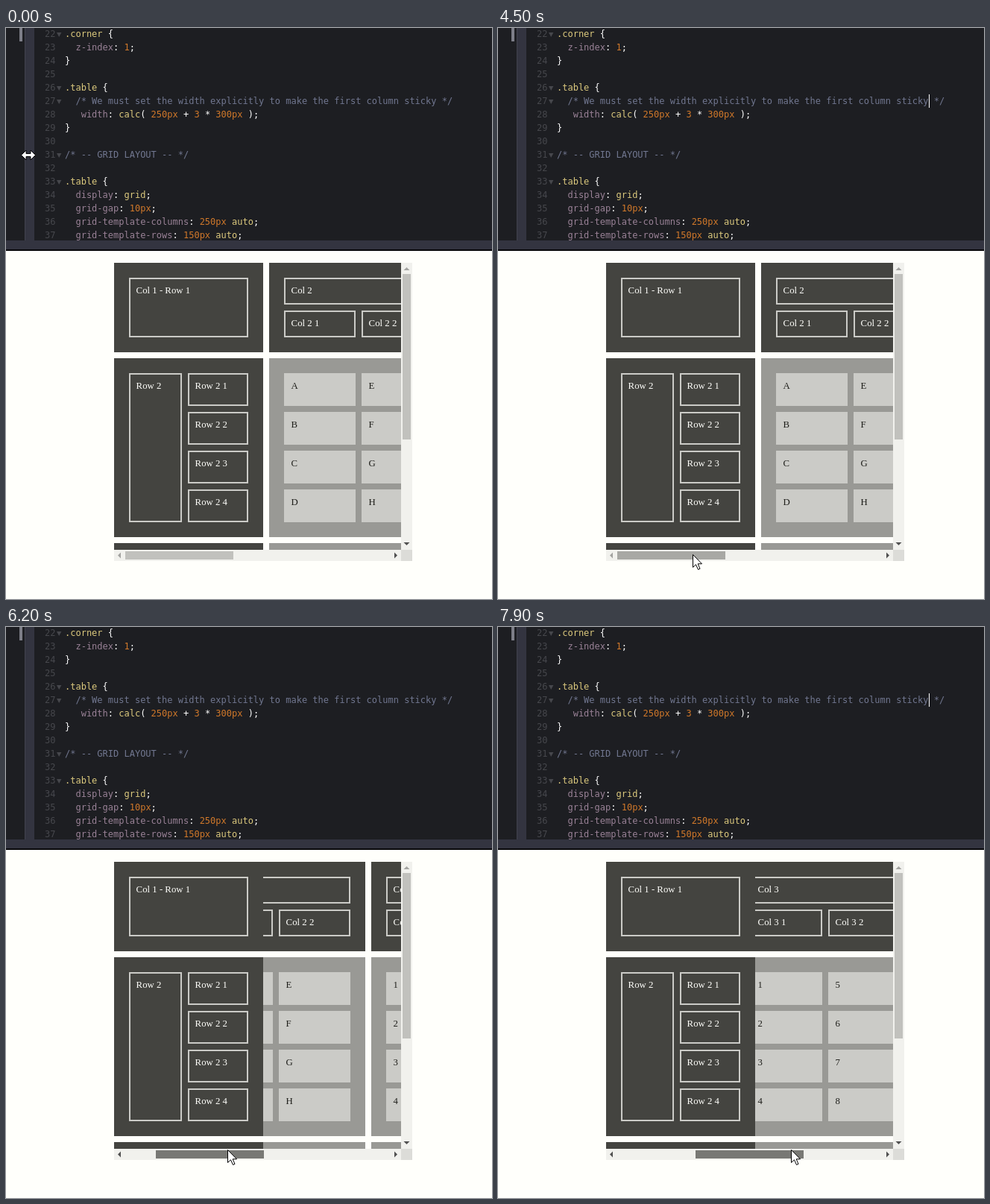
An HTML page that plays this animation: 652 by 766 pixels, repeating every 8000 ms.

```html
<!DOCTYPE html>
<html lang="en">
<head>
<meta charset="utf-8">
<title>Sticky table</title>
<style>
  html, body { margin: 0; width: 100%; height: 100%; overflow: hidden; background: #fffffb; }
  svg { display: block; }
  text { white-space: pre; }
  .code text { font: 12px "DejaVu Sans Mono", monospace; }
  .num { fill: #46474c; }
  .y { fill: #ddca7e; }
  .p { fill: #9a8297; }
  .n { fill: #d0782a; }
  .c { fill: #717790; }
  .w { fill: #fff; }
  .label { font: 12.8px "Liberation Serif", "Times New Roman", serif; }
  .cursor { fill: #fff; stroke: #000; }
</style>
</head>
<body>
<svg id="stage" width="652" height="766" viewBox="0 0 652 766"></svg>
<script>
const DARK = '#444440', LINE = '#cbcbc7', GREY = '#999995', INK = '#1f1f1b', PAPER = '#fffffb';
const ARROW_ON = '#505050', ARROW_OFF = '#a3a3a0';
const LOOP = 8000, STEP = 100, MAX_SCROLL = 559, THUMB_RANGE = 210;

function add(parent, tag, attrs = {}, content = '') {
  const el = document.createElementNS('http://www.w3.org/2000/svg', tag);
  for (const key in attrs) el.setAttribute(key, attrs[key]);
  el.textContent = content;
  parent.appendChild(el);
  return el;
}
const rect = (parent, x, y, width, height, fill) => add(parent, 'rect', { x, y, width, height, fill });
const path = (parent, d, fill) => add(parent, 'path', { d, fill });

const stage = document.getElementById('stage');

// Code editor
const lines = [
  'y.corner|w {', 'p  z-index|w: |n1|w;', 'w}', '',
  'y.table|w {',
  'c  /* We must set the width explicitly to make the first column sticky */',
  'p   width|w: |ycalc|w( |n250px|w + |n3|w * |n300px|w );', 'w}', '',
  'c/* -- GRID LAYOUT -- */', '',
  'y.table|w {', 'p  display|w: |ygrid|w;', 'p  grid-gap|w: |n10px|w;',
  'p  grid-template-columns|w: |n250px|w |yauto|w;',
  'p  grid-template-rows|w: |n150px|w |yauto|w;'
];
const folds = [22, 26, 27, 31, 33];

rect(stage, 0, 0, 652, 298, '#1d1e22');
rect(stage, 18, 0, 4, 18, '#7d7e88');
rect(stage, 25, 0, 13, 286, '#333440');
rect(stage, 25, 0, 1, 285, '#42434e');

const code = add(stage, 'g', { class: 'code' });
lines.forEach((line, i) => {
  const y = 12 + i * 18, number = 22 + i;
  add(code, 'text', { x: 66.4, y, class: 'num', 'text-anchor': 'end' }, number);
  if (folds.includes(number)) path(code, `M68 ${y - 6}h6.4l-3.2 6z`, '#46474c');
  const row = add(code, 'text', { x: 79, y });
  if (line) line.split('|').forEach(part => add(row, 'tspan', { class: part[0] }, part.slice(1)));
});
const caret = rect(stage, 578, 89, 1, 18, '#fff');

rect(stage, 0, 285, 652, 12, '#333440');
rect(stage, 0, 297, 652, 2, '#08080a');
rect(stage, 0, 299, 652, 467, PAPER);

// Table
function label(parent, x, y, text, fill) {
  add(parent, 'text', { x: x + 9.6, y: y + 21, fill, class: 'label' }, text);
}
function frame(parent, x, y, w, h, text) {
  add(parent, 'rect', { x: x + 1, y: y + 1, width: w - 2, height: h - 2, fill: 'none', stroke: LINE, 'stroke-width': 2 });
  label(parent, x, y, text, PAPER);
}
function column(parent, x, name, cells) {
  rect(parent, x, 315, 240, 120, DARK);
  frame(parent, x + 20, 335, 200, 36, name);
  frame(parent, x + 20, 379, 96, 36, name + ' 1');
  frame(parent, x + 124, 379, 96, 36, name + ' 2');
  rect(parent, x, 443, 240, 240, GREY);
  rect(parent, x, 691, 240, 240, GREY);
  [...cells].forEach((cell, i) => {
    const cx = x + 20 + 104 * Math.floor(i / 4), cy = 463 + 52 * (i % 4);
    rect(parent, cx, cy, 96, 44, LINE);
    label(parent, cx, cy, cell, INK);
  });
}

const view = add(stage, 'svg', { x: 145, y: 315, width: 385, height: 385, viewBox: '145 315 385 385' });
const sheet = add(view, 'g');
['ABCDEFGH', '12345678', 'ΑΒΓΔΕΖΗΘ'].forEach((cells, i) => column(sheet, 353 + 248 * i, 'Col ' + (i + 2), cells));
rect(view, 145, 315, 200, 120, DARK);
frame(view, 165, 335, 160, 80, 'Col 1 - Row 1');
rect(view, 145, 443, 200, 240, DARK);
rect(view, 145, 691, 200, 240, DARK);
frame(view, 165, 463, 71, 200, 'Row 2');
for (let i = 0; i < 4; i++) frame(view, 244, 463 + 52 * i, 81, 44, 'Row 2 ' + (i + 1));

// Scrollbars
rect(stage, 530, 315, 15, 385, '#f1f1ed');
rect(stage, 145, 700, 385, 15, '#f1f1ed');
rect(stage, 530, 700, 15, 15, '#dcdcd8');
rect(stage, 532, 330, 11, 222, '#c1c1bd');
path(stage, 'M533.5 325l4-4 4 4z', ARROW_OFF);
path(stage, 'M533.5 690l4 4 4-4z', ARROW_ON);
const leftArrow = path(stage, 'M154 703.5v8l-4-4z');
const rightArrow = path(stage, 'M521 703.5v8l4-4z');
const thumb = rect(stage, 160, 702, 145, 11);

// Mouse cursors, each drawn around its hot spot
const shapes = {
  resize: 'M-9.5 .5L-3-6V-1.5H3V-6L9.5 .5L3 7V2.5H-3V7Z',
  beam: 'M-3.5-7.5H-1L.5-6.5L2-7.5H4V-5.5H2L1.5-5V5L2 5.5H4V7.5H2L.5 6.5L-1 7.5H-3.5V5.5H-1L-.5 5V-5L-1-5.5H-3.5Z',
  arrow: 'M.5 .5V17.5L4.5 13.8L7.5 20.5L10 19.4L7.2 12.8H12.5Z'
};
const cursor = add(stage, 'path', { class: 'cursor' });

// Motion: rows of time, then values
const mouse = [
  [0, 30, 170], [200, 30, 170], [600, 96, 109], [800, 118, 112], [1000, 118, 112],
  [1400, 240, 128], [1700, 334, 124], [1800, 334, 124], [2400, 114, 120], [2500, 114, 120],
  [3000, 215, 205], [3400, 316, 299], [3800, 333, 610], [4000, 292, 721], [4100, 262, 707], [4200, 262, 707],
  [4300, 261, 706], [4500, 261, 706], [5300, 432, 711], [5600, 480, 716], [5800, 480, 716],
  [6200, 297, 701], [6400, 246, 703], [6500, 246, 703], [7200, 487, 708], [7400, 484, 707], [7900, 393, 701]
];
const scrolls = [
  [0, 0], [4500, 0], [5300, 449], [5500, 559], [5800, 559], [6200, 111],
  [6400, 0], [6500, 0], [7200, 559], [7400, 559], [7900, 282]
];

// Smooth curve through the keys that never overshoots them
function at(keys, t, col = 1) {
  const last = keys.length - 1;
  if (t >= keys[last][0]) return keys[last][col];
  const i = keys.findIndex(k => k[0] > t) - 1;
  const slope = j => (keys[j + 1][col] - keys[j][col]) / (keys[j + 1][0] - keys[j][0]);
  const tangent = j => {
    if (j === 0) return 0;
    if (j === last) return slope(j - 1);
    const a = slope(j - 1), b = slope(j);
    return a * b <= 0 ? 0 : 2 * a * b / (a + b);
  };
  const span = keys[i + 1][0] - keys[i][0], u = (t - keys[i][0]) / span, v = 1 - u;
  return v * v * (1 + 2 * u) * keys[i][col] + u * u * (3 - 2 * u) * keys[i + 1][col]
    + span * u * v * (v * tangent(i) - u * tangent(i + 1));
}

function draw(t) {
  const x = Math.round(at(mouse, t)), y = Math.round(at(mouse, t, 2));
  const scroll = Math.round(at(scrolls, t));
  const left = Math.floor(160 + scroll * THUMB_RANGE / MAX_SCROLL);
  const hover = y >= 700 && y < 715 && x >= left && x < left + 145;
  const kind = x < 38 ? 'resize' : y < 285 ? 'beam' : 'arrow';

  sheet.setAttribute('transform', `translate(${-scroll} 0)`);
  thumb.setAttribute('x', left);
  thumb.setAttribute('fill', t >= 4600 ? '#787874' : hover ? '#a8a8a4' : '#c1c1bd');
  leftArrow.setAttribute('fill', scroll > 0 ? ARROW_ON : ARROW_OFF);
  rightArrow.setAttribute('fill', scroll < MAX_SCROLL ? ARROW_ON : ARROW_OFF);
  cursor.setAttribute('d', shapes[kind]);
  cursor.setAttribute('transform', `translate(${x} ${y})`);
  caret.setAttribute('visibility', t >= 4450 && (t - 4450) % 1060 < 530 ? 'visible' : 'hidden');
}

function tick() {
  const t = performance.now() % LOOP;
  draw(Math.floor(t / STEP) * STEP);
  requestAnimationFrame(tick);
}
tick();
</script>
</body>
</html>
```
